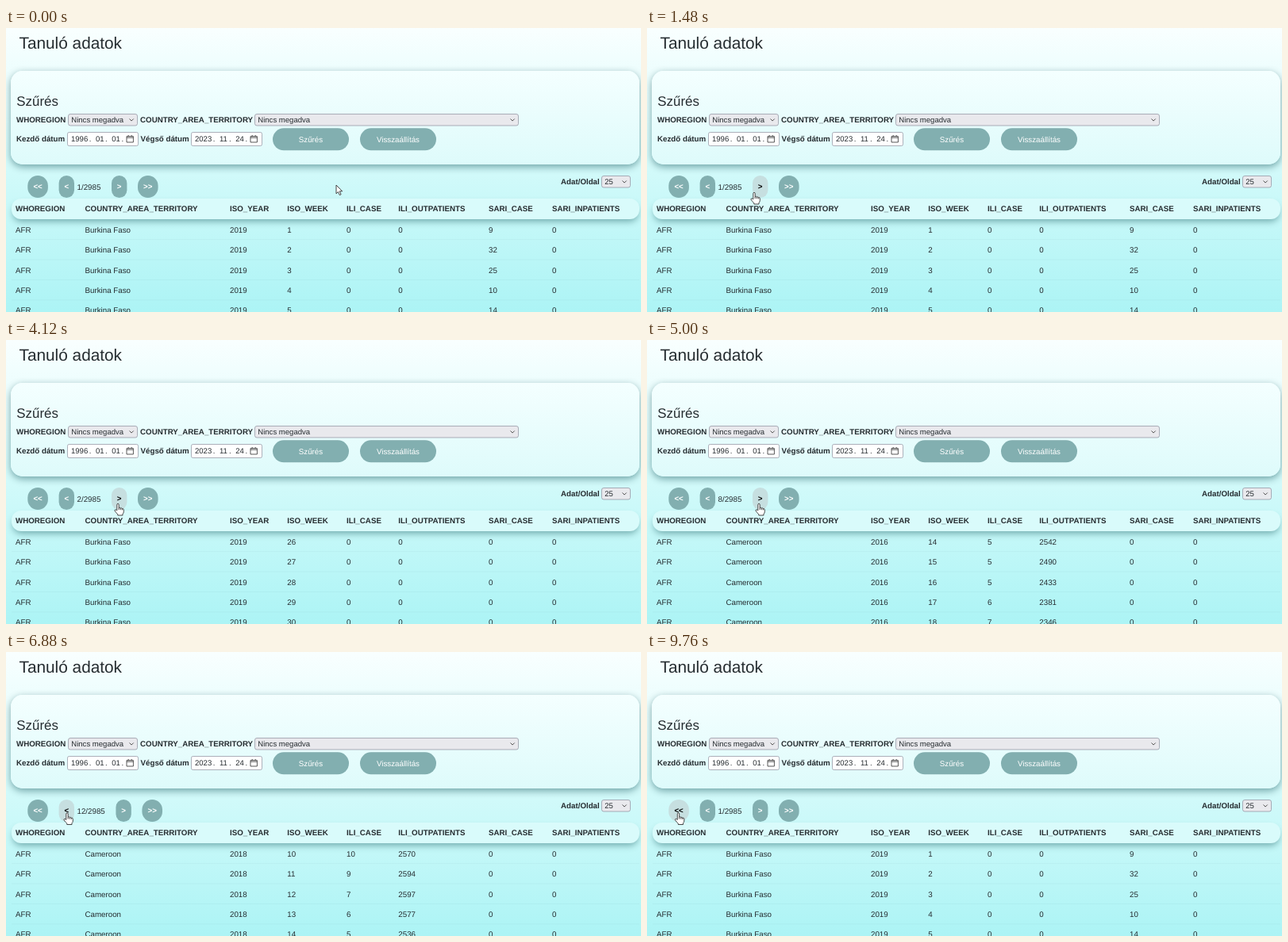
These frames come from a looping animation (800x358 px, 9.8 s). An HTML page:

```html
<!DOCTYPE html>
<html lang="hu">
<head>
<meta charset="utf-8">
<title>Tanuló adatok</title>
<style>
  html, body { margin: 0; width: 100%; height: 100%; overflow: hidden; }
  body { background: linear-gradient(#f9ffff, #d2fafa 50%, #acf4f5); }
  #stage { position: relative; width: 800px; height: 358px; overflow: hidden; }
  .card, .head { position: absolute; box-sizing: border-box; }
  .card {
    left: 6px; top: 54px; width: 792px; height: 118px; border-radius: 15px;
    background: linear-gradient(#f4ffff, #defbfb);
    box-shadow: 0 3px 10px rgba(0, 70, 75, .48);
  }
  .head {
    left: 7px; top: 215px; width: 791px; height: 25.5px; border-radius: 12px;
    background: #d9fbfb;
    box-shadow: 0 5px 9px -2px rgba(0, 70, 75, .42);
  }
  svg { position: absolute; left: 0; top: 0; display: block; }
  text {
    font: 9.75px "Liberation Sans", Arial, sans-serif;
    fill: #262c30; text-rendering: geometricPrecision;
  }
  .b { font-weight: bold; }
  .title { font-size: 20.8px; }
  .sub { font-size: 16.9px; }
  .field { font-size: 9.55px; }
  .mid { text-anchor: middle; }
  .light { fill: #fff; }
  .pill { fill: #82afb0; }
  .over .pill { fill: #c6dfe0; }
  .over .light { fill: #000; }
  .select { fill: #e9e9ed; stroke: #8f8f9d; stroke-width: .7; }
  .date { fill: #fff; stroke: #8f8f9d; stroke-width: .7; }
  .icon { fill: none; stroke: #444; stroke-width: .9; }
  .line { stroke: #003c46; stroke-opacity: .04; }
  .ptr { fill: #fff; stroke: #333; stroke-width: .9; stroke-linejoin: round; }
</style>
</head>
<body>
<div id="stage">
  <div class="card"></div>
  <div class="head"></div>
  <svg id="svg" width="800" height="358" viewBox="0 0 800 358"></svg>
</div>
<script>
const LOOP = 9800;
const svg = document.getElementById('svg');

function add(tag, attrs, parent = svg) {
  const el = document.createElementNS('http://www.w3.org/2000/svg', tag);
  for (const k in attrs) el.setAttribute(k, attrs[k]);
  parent.appendChild(el);
  return el;
}
function label(x, y, str, cls = '', parent = svg) {
  const el = add('text', { x, y, class: cls }, parent);
  el.textContent = str;
  return el;
}
function box(x, y, width, height, rx, cls, parent = svg) {
  return add('rect', { x, y, width, height, rx, class: cls }, parent);
}
function select(x, y, w, str) {
  box(x + .5, y + .5, w - 1, 14.5, 2.5, 'select');
  label(x + 4.3, y + 11, str, 'field');
  add('path', { d: `M${x + w - 10.5} ${y + 6.5}l2.6 2.6 2.6-2.6`, class: 'icon' });
}
function dateField(x, date) {
  box(x + .5, 131.5, 89, 17, 2, 'date');
  add('path', { d: `M${x + 75} 136.6h8.4v7.4h-8.4zM${x + 75} 138.2h8.4m-6.2-3.2v2m4-2v2`, class: 'icon' });
  x += 5;
  for (const part of date.split('.')) {
    label(x, 143.3, part, 'field');
    x += part.length * 5.31 + 1.5;
    label(x, 143.3, '.', 'field');
    x += 8.2;
  }
}
function button(x, y, w, str, cls = '') {
  const g = add('g', {});
  box(x, y, w, 28, Math.min(w / 2, 14), 'pill', g);
  label(x + w / 2, y + 17.4, str, 'mid light ' + cls, g);
  return g;
}

// Fixed parts
label(16.5, 26, 'Tanuló adatok', 'title');
label(13.3, 97.5, 'Szűrés', 'sub');
label(13, 118.8, 'WHOREGION', 'b');
select(78, 108, 88, 'Nincs megadva');
label(169, 118.8, 'COUNTRY_AREA_TERRITORY', 'b');
select(313, 108, 333, 'Nincs megadva');
label(13, 143.3, 'Kezdő dátum', 'b');
dateField(77, '1996.01.01');
label(169.5, 143.3, 'Végső dátum', 'b');
dateField(233, '2023.11.24');
button(336, 126.3, 96, 'Szűrés');
button(446, 126.3, 96, 'Visszaállítás');
label(699, 197, 'Adat/Oldal', 'b');
select(750, 186, 37, '25');

// Table
const COLS = {
  WHOREGION: 12, COUNTRY_AREA_TERRITORY: 99.5, ISO_YEAR: 282, ISO_WEEK: 354.3,
  ILI_CASE: 429, ILI_OUTPATIENTS: 494.3, SARI_CASE: 608, SARI_INPATIENTS: 688
};
for (const name in COLS) label(COLS[name], 230.9, name, 'b');
const rows = Array.from({ length: 5 }, (_, r) => {
  const y = 257.7 + r * 25.4;
  add('path', { d: `M7 ${y + 9}H798`, class: 'line' });
  return Object.values(COLS).map(x => label(x, y, ''));
});

const SARI = [9, 32, 25, 10, 14];
const PAGE_SIZE = 25;

function rowData(page, r) {
  const cameroon = page > 6;
  // Weeks counted from the start of 2015
  const n = r + (cameroon ? 165 + (page - 12) * PAGE_SIZE : 208 + (page - 1) * PAGE_SIZE);
  const year = 2015 + Math.floor(n / 52), week = n % 52 + 1;
  const season = Math.cos((week - 40) / 52 * 2 * Math.PI);
  const noise = Math.sin(n * 12.9898);
  const cases = cameroon ? Math.round(47 + 43 * season + 2 * noise) : 0;
  const patients = cameroon ? Math.round(2680 + 240 * season + 150 * noise) : 0;
  return ['AFR', cameroon ? 'Cameroon' : 'Burkina Faso', year, week, cases, patients,
    page === 1 ? SARI[r] : 0, 0];
}

// Pager
const pager = Object.entries({ '<<': 27.3, '<': 66.6, '>': 133, '>>': 166 }).map(([str, x]) => {
  const w = 13.2 + 6.2 * str.length;
  return { x, w, moves: str.includes('>'), g: button(x, 186, w, str, 'b') };
});
const counter = label(89.5, 203.8, '1/2985');
const baseWidth = counter.getComputedTextLength();
let shown = 0, shift = 0;

function showPage(page) {
  if (page === shown) return;
  shown = page;
  rows.forEach((cells, r) => rowData(page, r).forEach((v, c) => { cells[c].textContent = v; }));
  counter.textContent = page + '/2985';
  shift = counter.getComputedTextLength() - baseWidth;
  for (const b of pager) if (b.moves) b.g.setAttribute('transform', `translate(${shift})`);
}
function pageAt(t) {
  if (t < 3000 || t >= 8480) return 1;
  if (t >= 6960) return 11;
  if (t < 4200) return 2;
  return Math.min(12, 3 + Math.floor((t - 4200) / 135));
}

// Pointer: one curved sweep, then short straight moves
const progress = (t, from, to) => Math.min(1, Math.max(0, (t - from) / (to - from)));
const bezier = (k, a, b, c, d) =>
  a * (1 - k) ** 3 + 3 * b * k * (1 - k) ** 2 + 3 * c * k * k * (1 - k) + d * k ** 3;
const MOVES = [
  { from: 1380, to: 1480, x: 135, y: 208 },
  { from: 2960, to: 3160, x: 141, y: 207 },
  { from: 5480, to: 5760, x: 182, y: 203.5 },
  { from: 6120, to: 6760, x: 77, y: 203.5 },
  { from: 7160, to: 7880, x: 39.5, y: 203.5 }
];
function pointerAt(t) {
  const k = progress(t, 700, 1240);
  let x = bezier(k, 416, 330, 40, 110), y = bezier(k, 198, 270, 245, 208);
  for (const m of MOVES) {
    const p = progress(t, m.from, m.to);
    x += (m.x - x) * p;
    y += (m.y - y) * p;
  }
  return [x, y];
}
const arrow = add('path', { d: 'M0 0v10.8l2.5-2.3 1.8 4.1 1.8-.8-1.8-4h3.4z', class: 'ptr' });
const hand = add('path', {
  d: 'M-1.2 8V.6Q-1.2-.6 0-.6T1.2.6V4.6Q2.3 3.6 3.3 5 4.5 4.3 5.3 5.6 7.3 5.2 7.3 7.2V9.6' +
     'Q7.2 11.4 6 12.2V14H-.2V12.6Q-2.6 10.6-4 8.2-4.2 6.8-2.8 6.9-1.8 7.2-1.2 8z' +
     'M1.2 4.6V7M3.3 5V7.2M5.3 5.6V7.4',
  class: 'ptr'
});

function draw(t) {
  showPage(pageAt(t));
  const [x, y] = pointerAt(t);
  let over = false;
  for (const b of pager) {
    const left = b.x + (b.moves ? shift : 0);
    const hit = x >= left && x <= left + b.w && y >= 186 && y <= 214;
    b.g.setAttribute('class', hit ? 'over' : '');
    over = over || hit;
  }
  arrow.style.display = over ? 'none' : '';
  hand.style.display = over ? '' : 'none';
  (over ? hand : arrow).setAttribute('transform', `translate(${x} ${y})`);
}

const start = performance.now();
function frame() {
  draw((performance.now() - start) % LOOP);
  requestAnimationFrame(frame);
}
frame();
</script>
</body>
</html>
```
